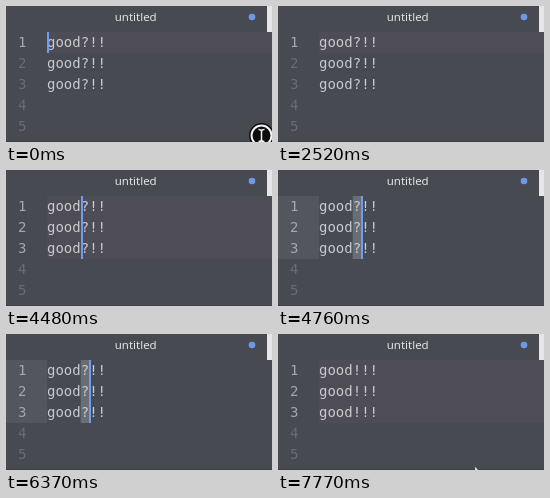
An HTML page that plays this animation: 266 by 136 pixels, repeating every 7840 ms.

```html
<!DOCTYPE html>
<html lang="en">
<head>
<meta charset="utf-8">
<title>Multiple cursors</title>
<style>
  html, body { margin: 0; width: 100%; height: 100%; overflow: hidden; background: #474a51; }
  svg { display: block; width: 266px; height: 136px; }
  .title { font: 11.5px "Noto Sans", "Open Sans", sans-serif; fill: #e2e3e6; text-anchor: middle; }
  .code { font: 14px "DejaVu Sans Mono", monospace; fill: #c6c9cf; white-space: pre; }
  .num { fill: #696c74; }
  .num.on { fill: #a4a7ad; }
  .line { fill: #4e4c55; }
  .gutter { fill: #53565d; }
  .sel { fill: #696d76; }
  .caret { fill: #6f9bf2; }
</style>
</head>
<body>
<svg viewBox="0 0 266 136">
  <rect width="266" height="136" fill="#474a51"/>
  <g id="rows"></g>
  <text class="title" x="129.7" y="15">untitled</text>
  <circle cx="246" cy="11" r="3.3" fill="#7097e6"/>
  <rect x="261" width="5" height="26" fill="#e6e6e8"/>
  <path d="M0 135.5H266" stroke="#3e4147"/>
  <g id="pointer">
    <g id="ring">
      <circle r="12.5" fill="#0c0c0d"/>
      <circle r="10" fill="none" stroke="#f2f2f2" stroke-width="2"/>
    </g>
    <path id="beam" d="M-3-6Q0-6 0-4Q0-6 3-6M0-4V4M-3 6Q0 6 0 4Q0 6 3 6" fill="none" stroke="#eee" stroke-width="1.5"/>
    <path id="arrow" d="M0 0V13L3 10H8Z" fill="#111" stroke="#fff" stroke-width="1.5"/>
  </g>
</svg>
<script>
const LOOP = 7840, TOP = 26, ROW = 21, LEFT = 41, CHAR = 8.43;
const $ = id => document.getElementById(id);

function add(tag, attrs) {
  const el = document.createElementNS("http://www.w3.org/2000/svg", tag);
  for (const key in attrs) el.setAttribute(key, attrs[key]);
  return $("rows").appendChild(el);
}

const show = (el, on) => el.setAttribute("visibility", on ? "visible" : "hidden");

// Number of moments in the list that have passed.
const passed = (t, list) => list.filter(m => t >= m).length;

const rows = [0, 1, 2, 3, 4].map(i => {
  const y = TOP + i * ROW;
  const box = (name, x, width) => add("rect", { class: name, x, y, width, height: ROW });
  const row = {
    line: box("line", LEFT, 266 - LEFT),
    gutter: box("gutter", 0, LEFT),
    sel: box("sel", LEFT + 4 * CHAR, CHAR),
    num: add("text", { class: "code num", x: 12, y: y + 15 }),
    text: add("text", { class: "code", x: LEFT, y: y + 15 }),
    caret: box("caret", LEFT, 2)
  };
  row.num.textContent = i + 1;
  return row;
});

function drawPointer(t) {
  const start = t < 140, end = t >= 7560, arrow = t >= 7770;
  const step = Math.floor((t - 7560) / 70);
  const x = start ? 255.5 : 252 - 18 * step;
  const y = start ? (t < 70 ? 129.5 : 138) : arrow ? 135 : 131 + 2 * step;
  show($("pointer"), start || end);
  $("pointer").setAttribute("transform", `translate(${x} ${y})`);
  $("ring").style.display = start ? "" : "none";
  $("beam").style.display = arrow ? "none" : "";
  $("arrow").style.display = arrow ? "" : "none";
}

function draw(t) {
  const count = 1 + passed(t, [3500, 3710]);
  const col = passed(t, [1260, 1540, 1820, 2170, 4760]);
  const selecting = t >= 4760 && t < 6650;
  // Each caret blink is an off moment and the moment it returns.
  const lit = passed(t, [490, 840, 2520, 2940, 3360, 3500, 4060, 4480,
                         5110, 5530, 5950, 6370, 6930, 7350, 7770]) % 2 === 0;
  rows.forEach((row, i) => {
    const active = i < count;
    show(row.line, active && !selecting);
    show(row.gutter, active && selecting);
    show(row.sel, active && selecting);
    show(row.caret, active && lit);
    row.caret.setAttribute("x", Math.round(LEFT + col * CHAR));
    row.num.classList.toggle("on", active);
    row.text.textContent = i > 2 ? "" : t < 6650 ? "good?!!" : "good!!!";
  });
  drawPointer(t);
}

const began = performance.now();
function tick() {
  draw((performance.now() - began) % LOOP);
  requestAnimationFrame(tick);
}
tick();
</script>
</body>
</html>
```
